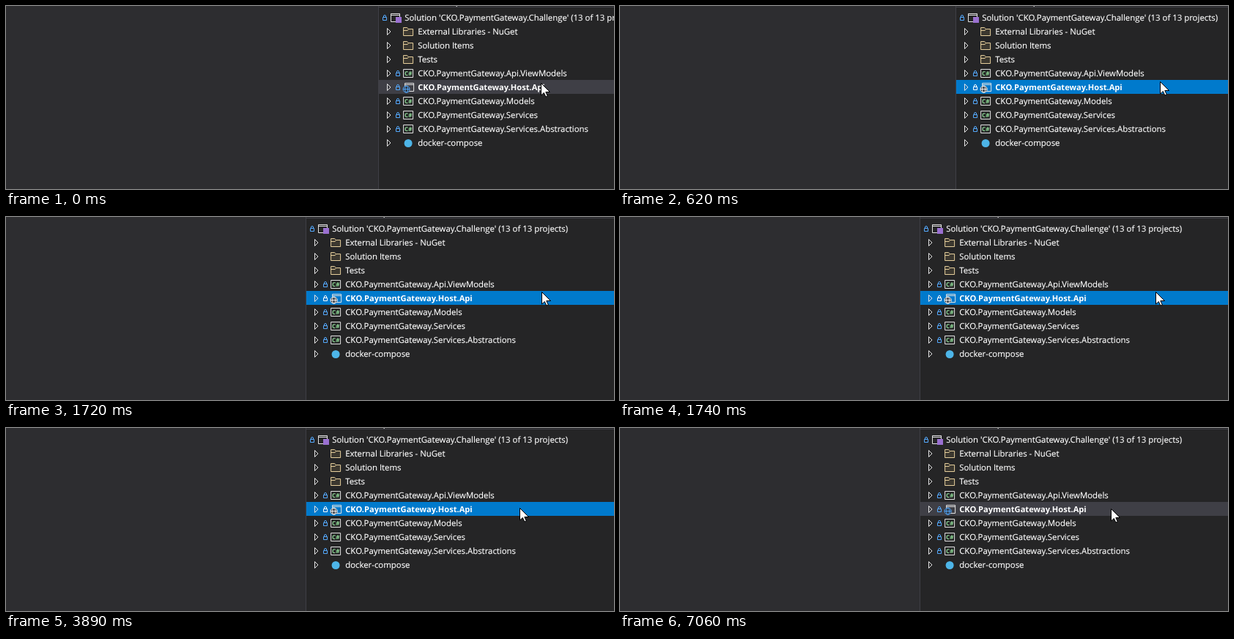
An HTML page for the animation above (8000 ms loop, 830 by 250 pixels).

```html
<!DOCTYPE html>
<html lang="en">
<head>
<meta charset="utf-8">
<title>Solution tree</title>
<style>
  html, body { margin: 0; width: 100%; height: 100%; overflow: hidden; background: #2d2d30; }
  svg { display: block; width: 830px; height: 250px; }
  text { font: 11.4px "Open Sans", "Noto Sans", sans-serif; fill: #fff; stroke: #fff; stroke-width: .15px; text-rendering: geometricPrecision; }
  .selected > text { font-size: 11.12px; font-weight: 700; stroke: none; }
  .letters { font-size: 8px; font-weight: 700; fill: #8fdc98; stroke: none; }
  .line { fill: none; stroke: #e4e4e4; }
  .tint { color: #55aaff; }
  .active .selected .tint { color: #fff; }
  #bar { fill: #3f3f46; }
  .active #bar { fill: #007acc; }
</style>
</head>
<body>
<svg viewBox="0 0 830 250">
  <rect width="830" height="250" fill="#2d2d30"/>
  <g id="panel">
    <rect width="430" height="250" fill="#252526"/>
    <text x="8" y="-1.5">Search Solution Explorer</text>
    <rect y="1" width="430" height="1" fill="#3f3f46"/>
    <rect width="1" height="250" fill="#3f3f46"/>
    <rect id="bar" x="1" y="101" width="430" height="19"/>
    <g id="rows"></g>
  </g>
  <path id="cursor" d="M0 0V16.5L3.8 13L6.4 18.6L8.8 17.5L6.3 12H12Z" fill="#fff" stroke="#000"/>
</svg>
<script>
const LOOP = 8000;
const $ = id => document.getElementById(id);

const rows = [
  ["solution", "Solution 'CKO.PaymentGateway.Challenge' (13 of 13 projects)"],
  ["folder", "External Libraries - NuGet"],
  ["folder", "Solution Items"],
  ["folder", "Tests"],
  ["code", "CKO.PaymentGateway.Api.ViewModels"],
  ["web", "CKO.PaymentGateway.Host.Api"],
  ["code", "CKO.PaymentGateway.Models"],
  ["code", "CKO.PaymentGateway.Services"],
  ["code", "CKO.PaymentGateway.Services.Abstractions"],
  ["compose", "docker-compose"]
];

const frame = '<path class="line" d="M.5 .5H12.5V11.5H.5Z M.5 2.5H12.5"/>';

// Each icon starts at the left of its slot, 6px above the row centre.
const icons = {
  solution: `${frame}<rect x="7" y="5" width="8" height="8" fill="#9a70d0"/>`,
  folder: '<path d="M.5 11.5V.5H5.5L7.5 2.5H13.5V11.5Z M7.5 2.5L6 4.5H.5" fill="#3b372f" stroke="#e6cf9c"/>',
  code: '<path class="line" d="M.5 .5H13.5V11.5H.5Z"/><text class="letters" x="2" y="8.9">C#</text>',
  web: `<g transform="translate(2)">${frame}</g>
    <g class="tint" stroke="currentColor" fill="none">
      <circle cx="4.5" cy="8.7" r="4.5" fill="#2b3038"/>
      <path d="M0 8.7H9"/><ellipse cx="4.5" cy="8.7" rx="2" ry="4.5"/>
    </g>`,
  compose: '<circle cx="7" cy="6.5" r="5.5" fill="#4db5e8"/>'
};

const place = (x, y, body) => `<g transform="translate(${x} ${y})">${body}</g>`;
const arrow = '<path class="line" d="M.5 .5V9.5L5 5Z"/>';
const lock = `<g class="tint" stroke="currentColor" fill="none">
  <path d="M.5 3.5H5.5V7.5H.5Z M1.5 3.5V2Q1.5 .5 3 .5T4.5 2V3.5"/></g>`;

$("rows").innerHTML = rows.map(([kind, label], i) => {
  const y = 16 + 19 * i, indent = i ? 18 : 0;
  const locked = ["solution", "code", "web"].includes(kind);
  return `<g class="${kind === "web" ? "selected" : ""}">` +
    (i ? place(12, y - 5, arrow) : "") +
    (locked ? place(6 + indent, y - 4, lock) : "") +
    place(17 + indent * .95, y - 6, icons[kind]) +
    `<text x="${36.2 + indent}" y="${y + 4}">${label}</text></g>`;
}).join("");

const clamp = (v, lo, hi) => Math.min(hi, Math.max(lo, v));
const move = (el, x, y) => el.setAttribute("transform", `translate(${x} ${y})`);

// Pointer moves: start time, end time, x and y reached; it rests in between.
const moves = [
  [370, 620, 738, 104],
  [620, 690, 732, 103],
  [3050, 3180, 728, 104],
  [3440, 3890, 702, 110],
  [3890, 4140, 667, 114],
  [4590, 4710, 671, 111]
];

function pointer(t) {
  let x = 731, y = 106;
  for (const [start, end, toX, toY] of moves) {
    const k = clamp((t - start) / (end - start), 0, 1);
    x += (toX - x) * k;
    y += (toY - y) * k;
  }
  return [Math.round(x), Math.round(y)];
}

// The panel edge is dragged left at a steady speed, then settles by one pixel.
const panelX = t => t < 1720 ? Math.round(clamp(508 - .7 * (t - 550), 410, 508)) : 409;

function draw(t) {
  const [x, y] = pointer(t);
  move($("panel"), panelX(t), 0);
  move($("cursor"), x - .5, y - .5);
  $("panel").classList.toggle("active", t >= 590 && t < 7060);
}

function tick() {
  draw(performance.now() % LOOP);
  requestAnimationFrame(tick);
}
tick();
</script>
</body>
</html>
```
